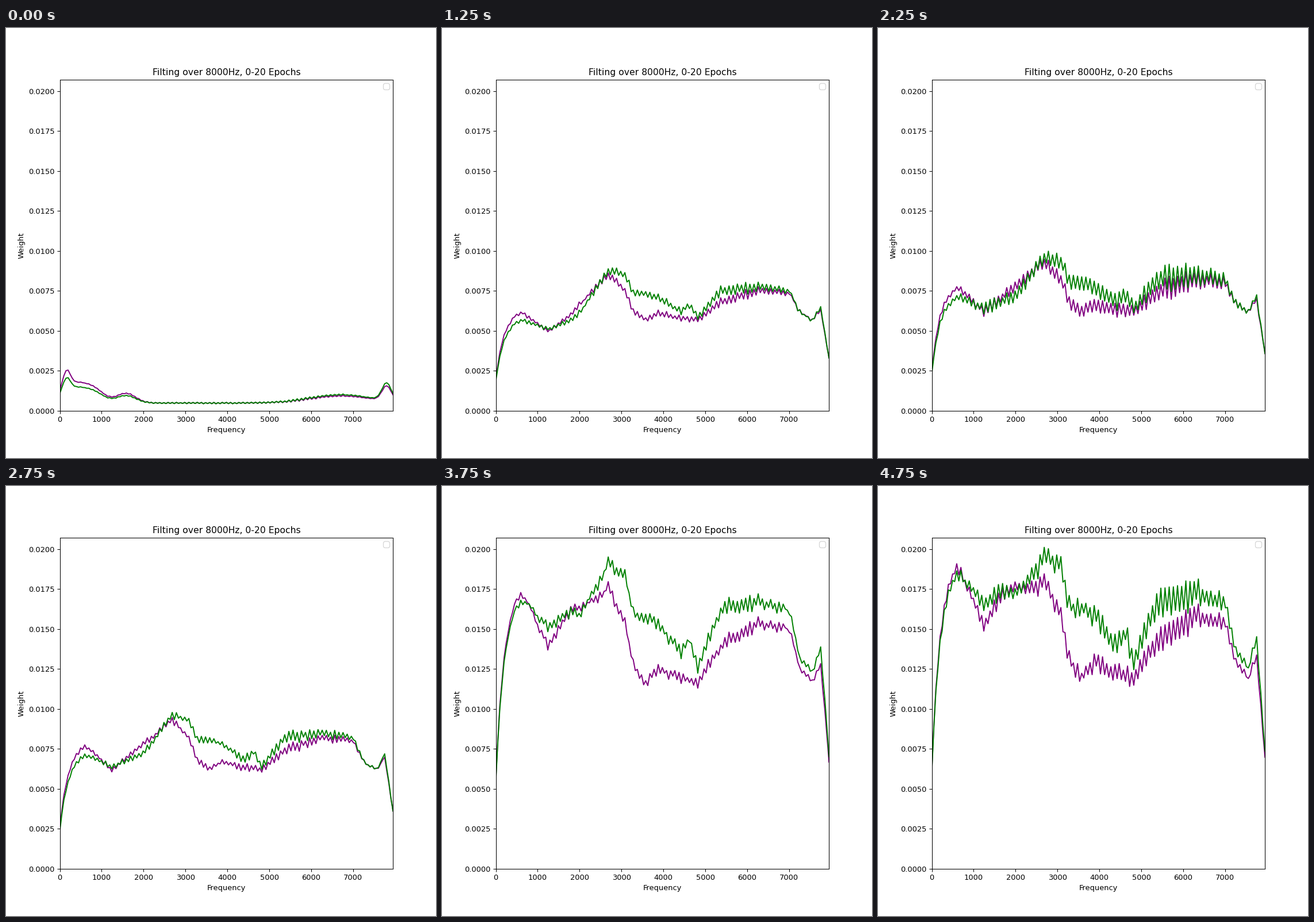
Recreate the animation shown at these times as a matplotlib script. Size 748 by 748 pixels, loop 5000 ms.

```python
import numpy as np
import matplotlib.pyplot as plt
from matplotlib.animation import FuncAnimation

BINS = 161
FRAMES, STEP_MS = 20, 250
UNIT = 1e-4

k = np.arange(BINS)
freq = k * 8000 / BINS


def bump(center, width):
    return np.exp(-((k - center) / width) ** 2 / 2)


def fade(center, width):
    """Smooth step from one down to zero."""
    return 1 / (1 + np.exp((k - center) / width))


# Key points of the trained spectra; the low end rises exponentially
BENDS = [0, 12, 25, 40, 54, 62, 66, 72, 78, 89, 93, 97, 108, 126, 141, 146,
         152, 156, 160]
RISE = 1 - 0.68 * np.exp(-k / 4)
PURPLE = RISE * np.interp(k, BENDS, [
    77, 79, 62, 78, 93, 82, 68, 62, 67, 63, 63, 62, 74, 82, 80, 67, 62, 69, 36])
GREEN = RISE * np.interp(k, BENDS, [
    72, 73, 64, 72, 96, 93, 81, 80, 78, 68, 73, 64, 82, 85, 82, 67, 62, 71, 36])

# Even and odd bins alternate, most strongly in two regions
RIPPLE = (-1.0) ** k * (6.5 * np.sqrt(np.sin(np.pi * k / (BINS - 1)).clip(0))
                        + 5 * bump(118, 12))


def untrained(low, high):
    """Nearly flat first spectrum with a raised low and high end."""
    return (4.8 + low * (10.4 * fade(20, 3) + 6 * bump(3.5, 1.5)
                         - 5 * np.exp(-k / 1.2) + 4.5 * bump(32, 4.5))
            + high * (5.2 * bump(135, 15) + 11 * bump(157, 2.3)))


def spectra(i):
    rng = np.random.default_rng(i)
    grain = 1 + 0.007 * rng.standard_normal(BINS)
    uneven = rng.uniform(0.7, 1.3, BINS)
    if i == 0:
        wave = 0.05 * RIPPLE * uneven
        return ((untrained(1.3, 0.85) * grain + wave) * UNIT,
                (untrained(1, 1) * grain + wave) * UNIT)

    level = np.interp(i, [1, 3, 4, 7, 11, 12, 13, 15, 16, 17, 19],
                      [0.4, 0.63, 0.87, 1, 1, 1.77, 1.77, 1.97, 2.12, 2, 2.03])
    tilt = np.interp(i, [1, 3, 7, 11, 12, 19], [-0.27, -0.25, 0, 0, 0.14, 0.28])
    swing = np.interp(i, [3, 7, 11, 13, 15, 19],
                      [-0.5, 1, 0.25, 0.65, 0.35, 0.75])

    gain = level * grain * (1 + tilt * fade(42, 4))
    wave = swing * RIPPLE * uneven
    purple = PURPLE * gain * (1.05 - 0.05 * level) + 0.85 * wave
    return purple * UNIT, (GREEN * gain + wave) * UNIT


fig, ax = plt.subplots(figsize=(8, 8), dpi=93.5)
ax.set_title("Filting over 8000Hz, 0-20 Epochs")
ax.set_xlabel("Frequency")
ax.set_ylabel("Weight")
ax.set_xlim(0, freq[-1])
ax.set_ylim(0, 207.14 * UNIT)
lines = [ax.plot(freq, y, color=c)[0]
         for y, c in zip(spectra(0), ("purple", "green"))]
ax.legend([], [], loc="upper right")


def draw(i):
    for line, y in zip(lines, spectra(i)):
        line.set_ydata(y)
    return lines


anim = FuncAnimation(fig, draw, frames=FRAMES, interval=STEP_MS,
                     repeat=True, repeat_delay=0)
plt.show()
```
